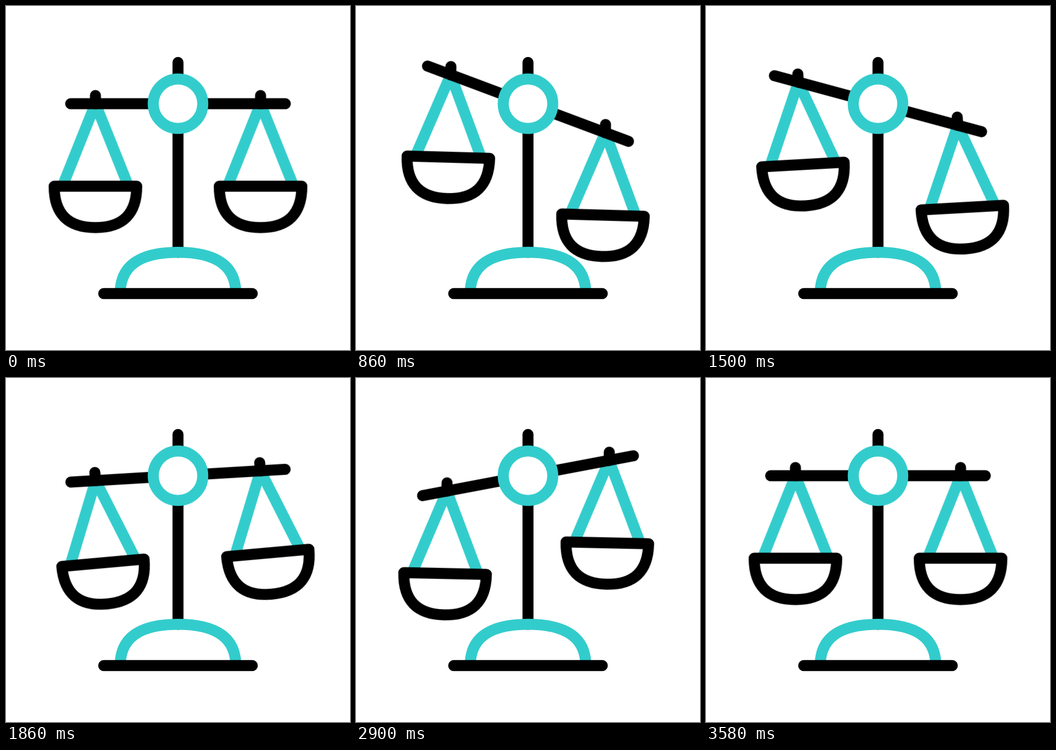
Write an HTML page that moves like this. It is 640 by 640 pixels and loops after 3600 ms.

```html
<!DOCTYPE html>
<html lang="en">
<head>
<meta charset="utf-8">
<title>Balance scale</title>
<style>
  html, body { margin: 0; width: 100%; height: 100%; overflow: hidden; background: #fff; }
  svg { display: block; width: 100vw; height: 100vh; }
  .ink, .teal { fill: none; stroke-width: 20.48; stroke-linejoin: round; }
  .ink { stroke: #000; stroke-linecap: round; }
  .teal { stroke: #33cccc; }
</style>
</head>
<body>
<svg viewBox="0 0 640 640">
  <defs>
    <g id="pan">
      <path class="teal" d="M0 0L-61.44 153.6M0 0L61.44 153.6"/>
      <path class="ink" d="M0 -15.36V0"/>
      <path class="ink" d="M-76.8 153.6H76.8C76.8 204.8 51.2 230.4 0 230.4S-76.8 204.8 -76.8 153.6Z"/>
    </g>
  </defs>

  <path class="ink" d="M320 104.96V458.24"/>
  <path class="teal" d="M212.48 535.04C212.48 483.84 248.32 458.24 320 458.24S427.52 483.84 427.52 535.04"/>
  <path class="ink" d="M181.76 535.04H458.24"/>

  <g transform="translate(320 181.76)">
    <g class="beam">
      <g transform="translate(-153.6 0)"><g class="level"><g class="swing"><use href="#pan"/></g></g></g>
      <g transform="translate(153.6 0)"><g class="level"><g class="swing"><use href="#pan"/></g></g></g>
      <path class="ink" d="M-199.68 0H199.68"/>
    </g>
    <circle class="teal" r="46.08" style="fill:#fff"/>
  </g>
</svg>
<script>
  const LOOP = 3600;
  const SOFT = [.5, 0, .5, 1];

  // Each step: time in ms, angle in degrees, curve towards the next step
  const TILT = [
    [0, 0, SOFT],
    [1080, 22, SOFT],
    [2410, -16, SOFT],
    [LOOP, 0, SOFT]
  ];
  const SWAY = [
    [0, 0, SOFT],
    [540, 2.13, [.52, 0, .75, .7]],
    [1780, -6, [.2, .35, .52, 1]],
    [2960, 1.25, [.3, 0, .5, 1]],
    [LOOP, 0, SOFT]
  ];

  function rotate(selector, steps, sign = 1) {
    const frames = steps.map(([time, angle, curve]) => ({
      offset: time / LOOP,
      transform: `rotate(${sign * angle}deg)`,
      easing: `cubic-bezier(${curve})`
    }));
    for (const el of document.querySelectorAll(selector)) {
      el.animate(frames, { duration: LOOP, iterations: Infinity });
    }
  }

  rotate('.beam', TILT);
  rotate('.level', TILT, -1); // keeps the pans upright on the tilting beam
  rotate('.swing', SWAY);
</script>
</body>
</html>
```
